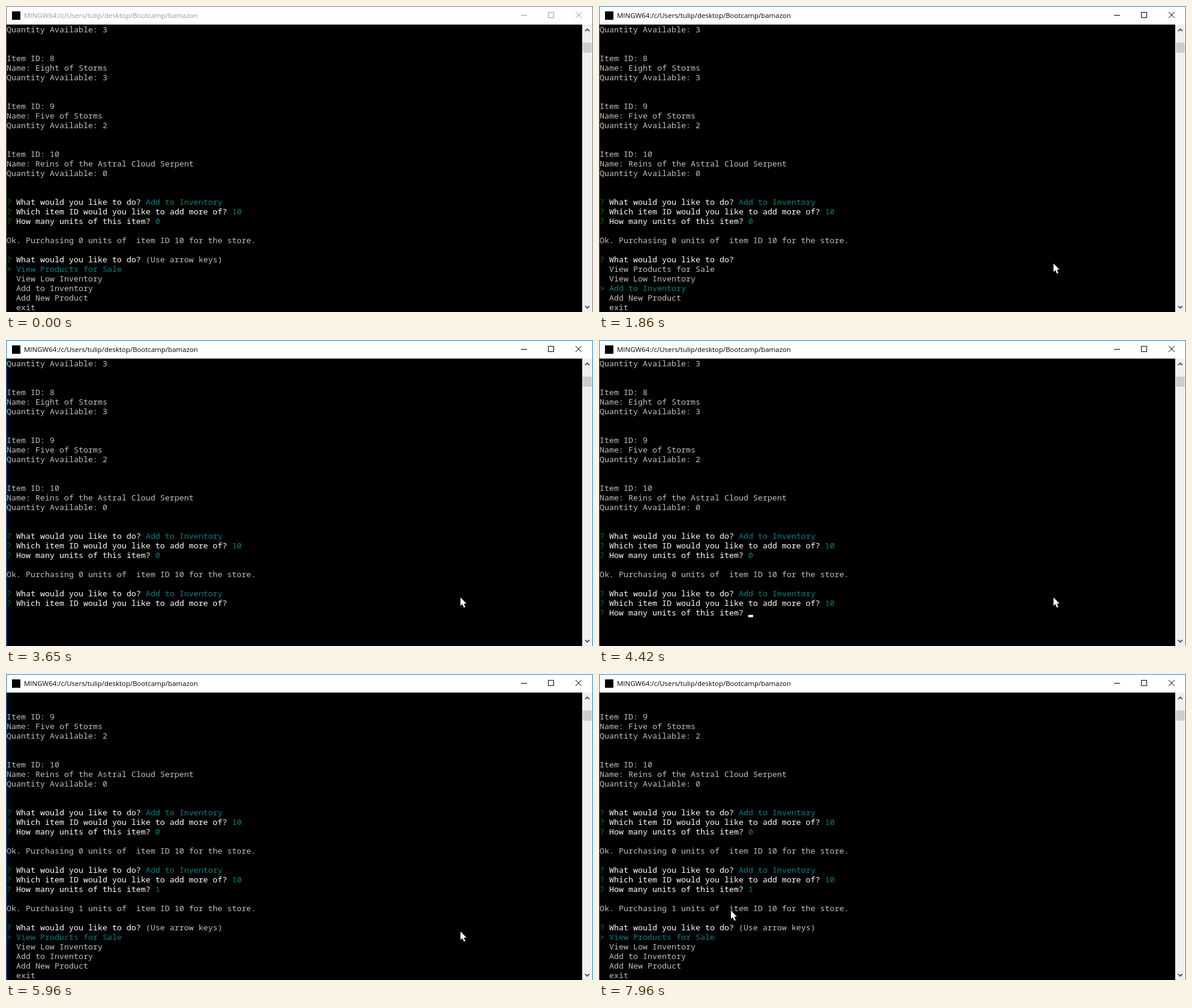
An HTML page for the animation above (8000 ms loop, 979 by 511 pixels).

```html
<!DOCTYPE html>
<html lang="en">
<head>
<meta charset="utf-8">
<title>Terminal</title>
<style>
  html, body { margin: 0; width: 100%; height: 100%; overflow: hidden; background: #000; }
  svg { display: block; }
  #rows text { font: 13.3333px "Noto Sans Mono", "DejaVu Sans Mono", monospace; white-space: pre; }
  #title { font: 11.48px "Open Sans", "Noto Sans", sans-serif; }
</style>
</head>
<body>
<svg width="979" height="511" viewBox="0 0 979 511">
  <rect width="979" height="511"/>
  <rect width="979" height="31" fill="#fff"/>
  <rect x="10" y="9" width="14" height="14"/>
  <text id="title" x="30" y="20">MINGW64:/c/Users/tulip/desktop/Bootcamp/bamazon</text>
  <g id="buttons" fill="none">
    <path d="M859 15.5h10M904.5 10.5h9v9h-9z"/>
    <path d="M950 10l10 10M960 10l-10 10"/>
  </g>
  <rect x="961" y="31" width="17" height="480" fill="#f0f0f0"/>
  <rect x="962" y="61" width="15" height="17" fill="#cdcdcd"/>
  <path d="M966 42l3.5-3.5l3.5 3.5M966 501l3.5 3.5l3.5-3.5" fill="none" stroke="#505050" stroke-width="1.8"/>
  <g id="rows"></g>
  <rect id="caret" width="8" height="4" fill="#fff"/>
  <path id="border" d="M.5 511V.5H978.5V511" fill="none"/>
  <path id="mouse" d="M0 0V14L3.2 11L5.7 17L8 16L5.6 10.2H10Z" fill="#fff" stroke="#000" stroke-width="2" paint-order="stroke"/>
</svg>
<script>
const LOOP = 8000, FOCUS = 530, CELL = 8, LINE = 16, TOP = 32, LEFT = 1;
const GREY = '#c0c0c0', WHITE = '#fff', TEAL = '#008080', GREEN = '#008000';
const $ = id => document.getElementById(id);
const set = (id, attrs) => {
  for (const name in attrs) $(id).setAttribute(name, attrs[name]);
};

// A row is a list of [text, colour] runs.
const plain = s => [[s, GREY]];
const ask = (q, a, color = TEAL) => [['?', GREEN], [` ${q} `, WHITE], [a, color]];
const WHAT = 'What would you like to do?';
const WHICH = 'Which item ID would you like to add more of?';
const MANY = 'How many units of this item?';
const HINT = '(Use arrow keys)';
const ADD = 'Add to Inventory';
const OPTIONS = ['View Products for Sale', 'View Low Inventory', ADD, 'Add New Product', 'exit'];
const BLANK = plain('');

const item = (id, name, qty) => [
  plain(`Item ID: ${id}`), plain(`Name: ${name}`), plain(`Quantity Available: ${qty}`), BLANK, BLANK
];
const askId = typed => [ask(WHAT, ADD), ask(WHICH, typed, GREY)];
const askCount = typed => [ask(WHAT, ADD), ask(WHICH, '10'), ask(MANY, typed, GREY)];
const bought = n => [
  ask(WHAT, ADD), ask(WHICH, '10'), ask(MANY, n), BLANK,
  plain(`Ok. Purchasing ${n} units of  item ID 10 for the store.`), BLANK
];
const menu = (pick, hint = '') => [
  ask(WHAT, hint, GREY),
  ...OPTIONS.map((o, i) => i === pick ? [['> ' + o, TEAL]] : plain('  ' + o))
];

const history = [
  plain('Quantity Available: 3'), BLANK, BLANK,
  ...item(8, 'Eight of Storms', 3),
  ...item(9, 'Five of Storms', 2),
  ...item(10, 'Reins of the Astral Cloud Serpent', 0),
  ...bought('0')
];

// What stands below the history, from each time on.
const scenes = [
  [0, menu(0, HINT)],
  [1310, menu(1)],
  [1860, menu(2)],
  [2410, askId('')],
  [3950, askId('1')],
  [4110, askId('10')],
  [4420, askCount('')],
  [5198, askCount('1')],
  [5960, [...bought('1'), ...menu(0, HINT)]]
].map(([at, tail]) => ({ at, rows: [...history, ...tail].slice(-30), first: 0 }));
const SCREEN = history.length + 6;
for (const s of scenes) {
  const full = s.at < 5960 ? s.rows.length : SCREEN;
  s.rows = s.at < 5960 ? s.rows : s.rows.slice(-full);
}

// A key press shows the caret; every tick of the blink clock then flips it.
const ticks = t => Math.floor((t - 2559) / 528);
const caretOn = (t, scene) => (ticks(t) - ticks(scene.at)) % 2 === 0;

// Pointer moves: start, end, then the curve's start, control and end points.
const moves = [
  [150, 350, [885, 512], [815, 462], [758, 430]],
  [6550, 7050, [758, 430], [420, 341], [254, 365]],
  [7130, 7360, [254, 365], [240, 380], [238, 410]],
  [7440, 7950, [238, 410], [205, 432], [220, 395]]
];

function pointerAt(t) {
  const [from, to, a, b, c] = moves.filter(m => m[0] <= t).pop();
  const k = Math.min(1, (t - from) / (to - from)), j = 1 - k;
  return a.map((v, i) => Math.round(j * j * v + 2 * j * k * b[i] + k * k * c[i]));
}

function drawRows(rows) {
  $('rows').innerHTML = rows.map((runs, r) => {
    let col = 0;
    return runs.map(([s, color]) => {
      const x = LEFT + col * CELL;
      col += s.length;
      return `<text x="${x}" y="${TOP + r * LINE + 12}" fill="${color}">${s.replace('>', '&gt;')}</text>`;
    }).join('');
  }).join('');
}

let shown = null;
function draw(t) {
  const scene = scenes.filter(s => s.at <= t).pop(), rows = scene.rows;
  if (scene !== shown) drawRows(rows);
  shown = scene;

  const active = t >= FOCUS, ink = active ? '#000' : '#999';
  set('title', { fill: ink });
  set('buttons', { stroke: ink });
  set('border', { stroke: active ? '#1883d7' : '#777' });

  // Only an open question ends in a three-run row.
  const last = rows[rows.length - 1];
  const typing = last.length === 3 && caretOn(t, scene);
  set('caret', {
    visibility: typing ? 'visible' : 'hidden',
    x: LEFT + CELL * last.reduce((n, [s]) => n + s.length, 0),
    y: TOP + LINE * (rows.length - 1) + 11
  });

  const inside = t >= moves[0][0];
  set('mouse', { visibility: inside ? 'visible' : 'hidden' });
  if (inside) set('mouse', { transform: `translate(${pointerAt(t)})` });
}

const start = performance.now();
function tick() {
  draw((performance.now() - start) % LOOP);
  requestAnimationFrame(tick);
}
tick();
</script>
</body>
</html>
```
